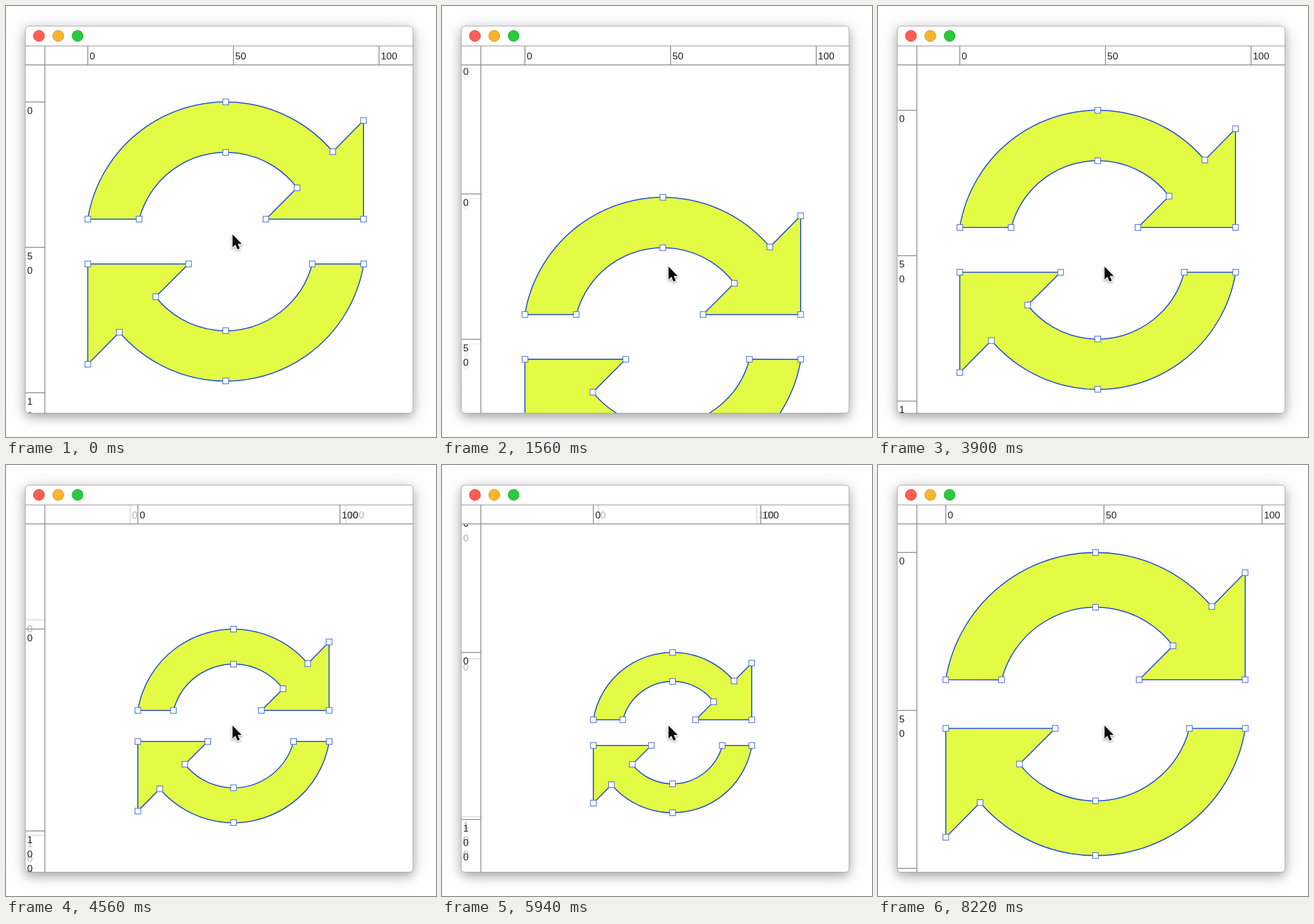
An HTML page with a canvas that plays this animation: 747x750 px, repeating every 8280 ms.

```html
<!DOCTYPE html>
<html lang="en">
<head>
<meta charset="utf-8">
<title>Zooming rulers</title>
<style>
  html, body { margin: 0; width: 100%; height: 100%; overflow: hidden; background: #fff; }
  canvas { display: block; }
</style>
</head>
<body>
<canvas id="stage" width="747" height="750"></canvas>
<script>
const ctx = document.getElementById('stage').getContext('2d');
const LOOP = 8280, STEP = 60;
const BLUE = '#2350cf', LINE = '#8a8a8a';
const WIN = { x: 33.5, y: 35, w: 673.5, h: 673.5, r: 6 };
const RULER = { x: 67.5, y: 102.5, top: 69.5, right: 707, bottom: 708 };

// Tracks: [time in ms, value]
const panY = [[900, 167], [1140, 265], [1380, 343], [1500, 335], [1560, 327], [1860, 240],
  [2100, 205], [2340, 217], [2400, 225], [2580, 232], [2940, 195], [3300, 181.5]];
const panX = [[900, 0], [1300, 2], [1700, 2], [2200, 0]];
const zoom = [[4080, 5.06], [4680, 3.1], [5040, 2.05], [5220, 1.858], [5280, 1.842], [5400, 1.83],
  [5880, 2.75], [6420, 4.65], [6480, 4.907], [6720, 5.3], [7020, 5.494]]
  .map(([t, s]) => [t, Math.log(s)]);
const cursorY = [[120, 397.5], [720, 453.5]];

// Monotone cubic interpolation with flat ends
function sample(track, t) {
  const last = track.length - 1;
  if (t <= track[0][0]) return track[0][1];
  if (t >= track[last][0]) return track[last][1];
  const slope = i => (track[i + 1][1] - track[i][1]) / (track[i + 1][0] - track[i][0]);
  const tangent = i => {
    if (i === 0 || i === last) return 0;
    const a = slope(i - 1), b = slope(i);
    return a * b <= 0 ? 0 : 2 * a * b / (a + b);
  };
  let i = 0;
  while (track[i + 1][0] < t) i++;
  const [t0, v0] = track[i], [t1, v1] = track[i + 1];
  const h = t1 - t0, p = (t - t0) / h, q = 1 - p;
  return v0 * (1 + 2 * p) * q * q + v1 * p * p * (3 - 2 * p)
    + h * p * q * (q * tangent(i) - p * tangent(i + 1));
}

// Zoom is anchored at a fixed point of the stage
function view(t, lag = 0) {
  const s = Math.exp(sample(zoom, t));
  return {
    s,
    x: 426 - 56.1 * s + sample(panX, t),
    y: 521.5 - 67.2 * s + sample(panY, t - lag) - 181.5
  };
}

function line(x0, y0, x1, y1) {
  ctx.beginPath();
  ctx.moveTo(x0, y0);
  ctx.lineTo(x1, y1);
  ctx.stroke();
}

function clipped(x, y, w, h, draw) {
  ctx.save();
  ctx.beginPath();
  ctx.rect(x, y, w, h);
  ctx.clip();
  draw();
  ctx.restore();
}

function windowPath() {
  ctx.beginPath();
  ctx.roundRect(WIN.x, WIN.y, WIN.w, WIN.h, WIN.r);
}

function drawWindow() {
  ctx.fillStyle = '#fff';
  ctx.fillRect(0, 0, 747, 750);
  for (const [blur, dy, alpha] of [[40, 4, 0.1], [18, 6, 0.32]]) {
    ctx.save();
    ctx.shadowColor = `rgba(0,0,0,${alpha})`;
    ctx.shadowBlur = blur;
    ctx.shadowOffsetY = dy;
    windowPath();
    ctx.fill();
    ctx.restore();
  }
}

function drawButtons() {
  const buttons = [[57.2, '#fd5e55', '#d9483f'], [90.8, '#f8b42d', '#cf942a'], [124.4, '#2bc840', '#25ad37']];
  ctx.lineWidth = 1;
  for (const [x, fill, edge] of buttons) {
    ctx.beginPath();
    ctx.arc(x, 52, 9.6, 0, 7);
    ctx.fillStyle = fill;
    ctx.fill();
    ctx.strokeStyle = edge;
    ctx.stroke();
  }
}

function drawRulers(v, alpha) {
  const unit = v.s >= 5 ? 50 : 100;
  ctx.save();
  ctx.globalAlpha = alpha;
  ctx.font = '17px "Liberation Sans", Arial, sans-serif';
  ctx.fillStyle = '#222';
  ctx.strokeStyle = LINE;
  ctx.lineWidth = 1.5;
  clipped(RULER.x + 1, RULER.top, RULER.right - RULER.x - 1, 33, () => {
    for (let n = -400; n <= 400; n += unit) {
      const x = v.x + n * v.s;
      line(x, RULER.top, x, RULER.y);
      ctx.fillText(Math.abs(n), x + 3.2, 93);
    }
  });
  clipped(WIN.x, RULER.y + 1, 34, RULER.bottom - RULER.y - 1, () => {
    for (let n = -400; n <= 400; n += unit) {
      const y = v.y + n * v.s;
      line(WIN.x, y, RULER.x, y);
      [...String(Math.abs(n))].forEach((digit, i) => ctx.fillText(digit, 36.7, y + 21 + i * 25.2));
    }
  });
  ctx.restore();
}

function drawRulerEdges() {
  ctx.strokeStyle = LINE;
  ctx.lineWidth = 1.5;
  line(WIN.x, RULER.y, RULER.right, RULER.y);
  line(RULER.x, RULER.top, RULER.x, RULER.bottom);
  ctx.lineWidth = 1.2;
  line(WIN.x, RULER.top, RULER.right, RULER.top);
}

// Each arrow: outer arc start/end, then corners, inner arc start/end
const MID = [47.35, 48], OUTER = 48, INNER = 30.68;
const arrows = [
  { outer: [[0, 40.3], [84.1, 17.1]], head: [[94.65, 6.35], [94.65, 40.3], [61.15, 40.3]],
    inner: [[71.85, 29.55], [17.6, 40.3]], tops: [0, 17.35] },
  { outer: [[94.7, 55.7], [10.85, 79.2]], head: [[0, 90.2], [0, 55.7], [34.6, 55.7]],
    inner: [[23.3, 67], [77.05, 55.7]], tops: [95.95, 78.65] }
];

function drawArrow(arrow, v) {
  const at = ([x, y]) => [v.x + x * v.s, v.y + y * v.s];
  const angle = ([x, y]) => Math.atan2(y - MID[1], x - MID[0]);
  const arc = ([a, b], r, back) => ctx.arc(...at(MID), r * v.s, angle(a), angle(b), back);
  ctx.beginPath();
  arc(arrow.outer, OUTER, false);
  arrow.head.forEach(p => ctx.lineTo(...at(p)));
  arc(arrow.inner, INNER, true);
  ctx.closePath();
  ctx.fillStyle = '#e4fb45';
  ctx.fill();
  ctx.strokeStyle = BLUE;
  ctx.lineWidth = 1.8;
  ctx.stroke();

  const tops = arrow.tops.map(y => [MID[0], y]);
  ctx.fillStyle = '#fff';
  ctx.strokeStyle = '#3c62d2';
  ctx.lineWidth = 1.1;
  for (const p of [...arrow.outer, ...arrow.head, ...arrow.inner, ...tops]) {
    const [x, y] = at(p);
    ctx.fillRect(x - 5, y - 5, 10, 10);
    ctx.strokeRect(x - 5, y - 5, 10, 10);
  }
}

function drawCursor(x, y) {
  const outline = new Path2D('M0 0V22.5L5 17.8L8.6 26L12.6 24.3L9.1 16.2H16Z');
  ctx.save();
  ctx.translate(x, y);
  ctx.lineJoin = 'round';
  ctx.shadowColor = 'rgba(0,0,0,0.4)';
  ctx.shadowBlur = 4;
  ctx.shadowOffsetY = 2;
  ctx.strokeStyle = '#fff';
  ctx.lineWidth = 2.6;
  ctx.stroke(outline);
  ctx.shadowColor = 'transparent';
  ctx.fillStyle = '#0a0a0a';
  ctx.fill(outline);
  ctx.restore();
}

function render(t) {
  const now = view(t), before = view(t - STEP), art = view(t, 40);
  drawWindow();
  ctx.save();
  windowPath();
  ctx.clip();
  drawButtons();
  const zoomed = Math.abs(now.s - before.s) > 0.002;
  if (zoomed || Math.abs(now.y - before.y) > 0.5) drawRulers(before, zoomed ? 0.35 : 0.12);
  drawRulers(now, 1);
  drawRulerEdges();
  clipped(RULER.x + 1, RULER.y + 1, RULER.right - RULER.x - 1, RULER.bottom - RULER.y - 1,
    () => arrows.forEach(arrow => drawArrow(arrow, art)));
  ctx.restore();
  windowPath();
  ctx.strokeStyle = '#a6a6a6';
  ctx.lineWidth = 1;
  ctx.stroke();
  drawCursor(393.5, sample(cursorY, t));
}

const start = performance.now();
function tick() {
  const t = (performance.now() - start) % LOOP;
  render(Math.floor(t / STEP) * STEP);
  requestAnimationFrame(tick);
}
tick();
</script>
</body>
</html>
```
